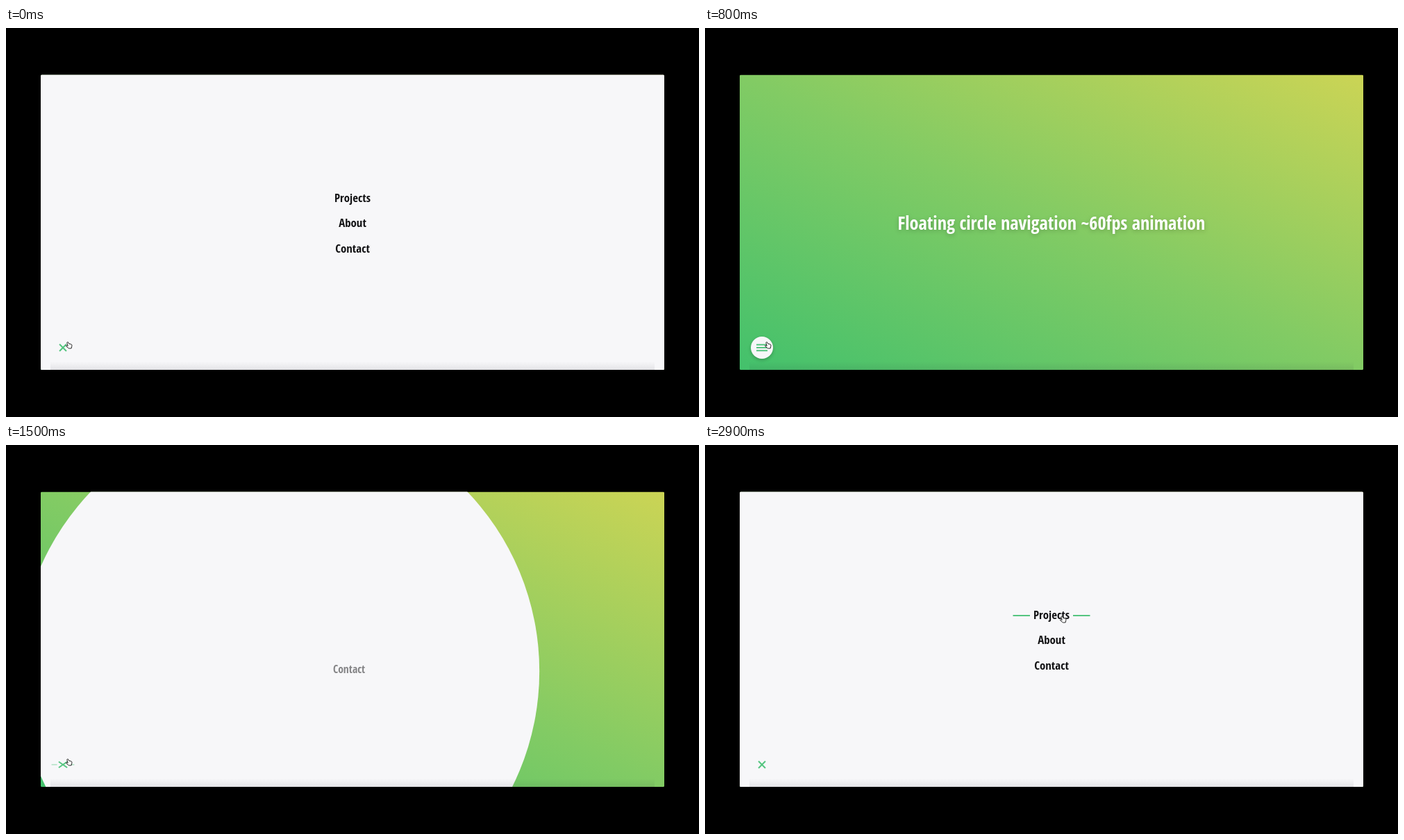
An HTML page that plays this animation: 998 px wide and 561 px high, repeating every 3000 ms.

```html
<!DOCTYPE html>
<html lang="en">
<head>
<meta charset="utf-8">
<title>Floating circle navigation</title>
<style>
  html, body { margin: 0; width: 100%; height: 100%; overflow: hidden; background: #000; }
  svg { display: block; width: 998px; height: 561px; }
  text { font-family: "Open Sans", sans-serif; font-stretch: 75%; font-weight: 600; text-anchor: middle; }
  #title { fill: #fff; font-size: 28px; filter: drop-shadow(0 2px 3px rgba(0, 0, 0, .2)); }
  #menu { fill: #131315; font-size: 17px; }
  .green { fill: none; stroke: #55c580; stroke-width: 2; }
  .mark { stroke-width: 1.8; }
  .pointer { stroke: #111; stroke-width: .9; stroke-linejoin: round; fill: #fff; }
</style>
</head>
<body>
<svg viewBox="0 0 998 561">
  <defs>
    <!-- The 50% line runs from the top left to the bottom right corner -->
    <linearGradient id="meadow" x1="0" y1="1" x2="1" y2="0">
      <stop offset="0" stop-color="#43c16c"/>
      <stop offset=".5" stop-color="#82cb64"/>
      <stop offset="1" stop-color="#cbd455"/>
    </linearGradient>
    <linearGradient id="shade" x1="0" y1="0" x2="0" y2="1">
      <stop offset="0" stop-color="#223" stop-opacity="0"/>
      <stop offset="1" stop-color="#223" stop-opacity=".09"/>
    </linearGradient>
    <filter id="soft" x="-50%" y="-50%" width="200%" height="200%">
      <feGaussianBlur stdDeviation="2.5"/>
    </filter>
    <clipPath id="panel"><rect x="50" y="67.5" width="898" height="425.5" rx="1.5"/></clipPath>
  </defs>
  <rect width="998" height="561"/>
  <g clip-path="url(#panel)">
    <rect x="50" y="67.5" width="898" height="425.5" fill="url(#meadow)"/>
    <text id="title" x="499" y="290.5">Floating circle navigation ~60fps animation</text>
    <circle id="shadow" cx="82" cy="463" r="16" fill="#000" filter="url(#soft)"/>
    <circle id="disc" fill="#f7f7f9"/>
    <g id="menu"></g>
    <rect x="64" y="481" width="870" height="12" fill="url(#shade)"/>
    <g transform="translate(82 461)" class="green">
      <path id="left" d="M-8 0H0"/>
      <path id="right" d="M0 0H8"/>
      <path id="top"/>
      <path id="bottom"/>
    </g>
  </g>
  <path id="hand" class="pointer" d="M-.7 .9Q-.2 -.9 1.2 .3L2.3 2.5L5.4 3.1Q6.7 3.6 6.4 5.4L5.6 9H1.9L-1.8 6Q-2.4 4.7 -1 4.8L.7 5.5Z"/>
  <path id="arrow" d="M0 0V8L1.8 6.4L3 9L4.3 8.4L3.1 5.9H5.5Z" fill="#111" stroke="#fff" stroke-width=".6"/>
</svg>
<script>
const LOOP = 3000, STEP = 100;
const $ = id => document.getElementById(id);
const clamp = v => Math.min(1, Math.max(0, v));
const mix = (a, b, k) => a + (b - a) * k;
const ramp = (t, start, length) => clamp((t - start) / length);
const ease = k => k * k * (3 - 2 * k);
const set = (el, attrs) => { for (const k in attrs) el.setAttribute(k, attrs[k]); };

function add(parent, tag, attrs, label = '') {
  const el = document.createElementNS('http://www.w3.org/2000/svg', tag);
  set(el, attrs);
  el.textContent = label;
  return parent.appendChild(el);
}

// label, centre line, half width, fade-in start, hover start and end
const items = [
  ['Projects', 245, 26, 1600, 2580, 3200],
  ['About', 281.5, 20, 1500, 2280, 2540],
  ['Contact', 318, 24.5, 1400, 2040, 2260]
].map(([label, y, half, show, over, out]) => {
  const g = add($('menu'), 'g', {});
  return {
    y, half, show, over, out, g,
    text: add(g, 'text', { y: 5.7 }, label),
    mark: add(g, 'path', { class: 'green mark' })
  };
});

// Use the most condensed face at hand, then size it to the layout
function setType() {
  const texts = document.querySelectorAll('text');
  const width = family => {
    texts.forEach(el => el.style.fontFamily = family + ', sans-serif');
    return $('title').getComputedTextLength();
  };
  const faces = ['"Open Sans Condensed"', '"Open Sans"', '"Roboto Condensed"', '"Noto Sans"'];
  const best = faces.map(f => [width(f), f]).sort((a, b) => a[0] - b[0])[0];
  const titleSize = 28 * 443 / width(best[1]);
  const menuSize = 17 * 52 / items[0].text.getComputedTextLength();
  $('title').style.fontSize = titleSize + 'px';
  $('menu').style.fontSize = menuSize + 'px';
}

// time, x, y of the pointer
const path = [
  [1600, 88.5, 453], [1700, 170, 430], [1800, 430, 350], [1900, 533.5, 318],
  [2000, 528, 319], [2100, 516, 317], [2200, 515, 311], [2300, 514, 288],
  [2500, 514, 279], [2600, 514, 252], [2700, 513.5, 247]
];
function pointerAt(t) {
  const i = path.findIndex(p => p[0] > t);
  if (i === 0) return path[0].slice(1);
  if (i < 0) return path[path.length - 1].slice(1);
  const [t0, x0, y0] = path[i - 1], [t1, x1, y1] = path[i];
  const k = ramp(t, t0, t1 - t0);
  return [mix(x0, x1, k), mix(y0, y1, k)];
}

function drawDisc(t) {
  const open = t < 1300 ? 1 - ease(ramp(t, 185, 240)) : ease(ramp(t, 1339, 240));
  set($('disc'), { cx: mix(82, 499, open), cy: mix(461, 280.5, open), r: mix(16, 497, open) });
  set($('shadow'), { opacity: t < 1350 ? .22 * ramp(t, 400, 200) : 0 });
}

function drawIcon(t) {
  const k = t < 1300 ? 1 - ramp(t, 250, 150) ** 1.3 : ramp(t, 1380, 200);
  const turn = 45 * Math.sqrt(k), arm = mix(8, 7, k), lift = 4.3 * clamp(1 - k * 1.7);
  set($('top'), { d: `M${-arm} 0H${arm}`, transform: `translate(0 ${-lift}) rotate(${turn})` });
  set($('bottom'), { d: `M${-arm} 0H${arm}`, transform: `translate(0 ${lift}) rotate(${-turn})` });
  const fade = clamp(1 - k) ** 1.2;
  set($('left'), { transform: `translate(${-14 * k} 0)`, opacity: fade });
  set($('right'), { transform: `translate(${14 * k} 0)`, opacity: fade });
}

function drawMenu(t) {
  for (const { y, half, show, over, out, g, mark } of items) {
    const k = t < 1300 ? 1 : ease(ramp(t, show, 200));
    const alpha = t < 1300 ? 1 - ramp(t, 185, 100) : k;
    const x = 499 - 10 * (1 - k);
    set(g, {
      transform: `translate(${x} ${y + 11 * (1 - k)}) scale(${mix(.86, 1, k)})`,
      opacity: alpha
    });
    const grow = 24.5 * ease(ramp(t, over, 200)) * (1 - ease(ramp(t, out, 150)));
    const a = half + 5;
    set(mark, {
      d: `M${-a} 1H${-a - grow}M${a} 1H${a + grow}`,
      visibility: grow > .1 ? 'visible' : 'hidden'
    });
  }
}

function drawPointer(t) {
  const [x, y] = pointerAt(t);
  const arrow = t > 1650 && t < 2050;
  const place = { transform: `translate(${x} ${y})` };
  set($('hand'), { ...place, visibility: arrow ? 'hidden' : 'visible' });
  set($('arrow'), { ...place, visibility: arrow ? 'visible' : 'hidden' });
}

function frame() {
  const t = Math.floor(performance.now() % LOOP / STEP) * STEP;
  drawDisc(t);
  drawIcon(t);
  drawMenu(t);
  drawPointer(t);
  requestAnimationFrame(frame);
}

setType();
frame();
</script>
</body>
</html>
```
